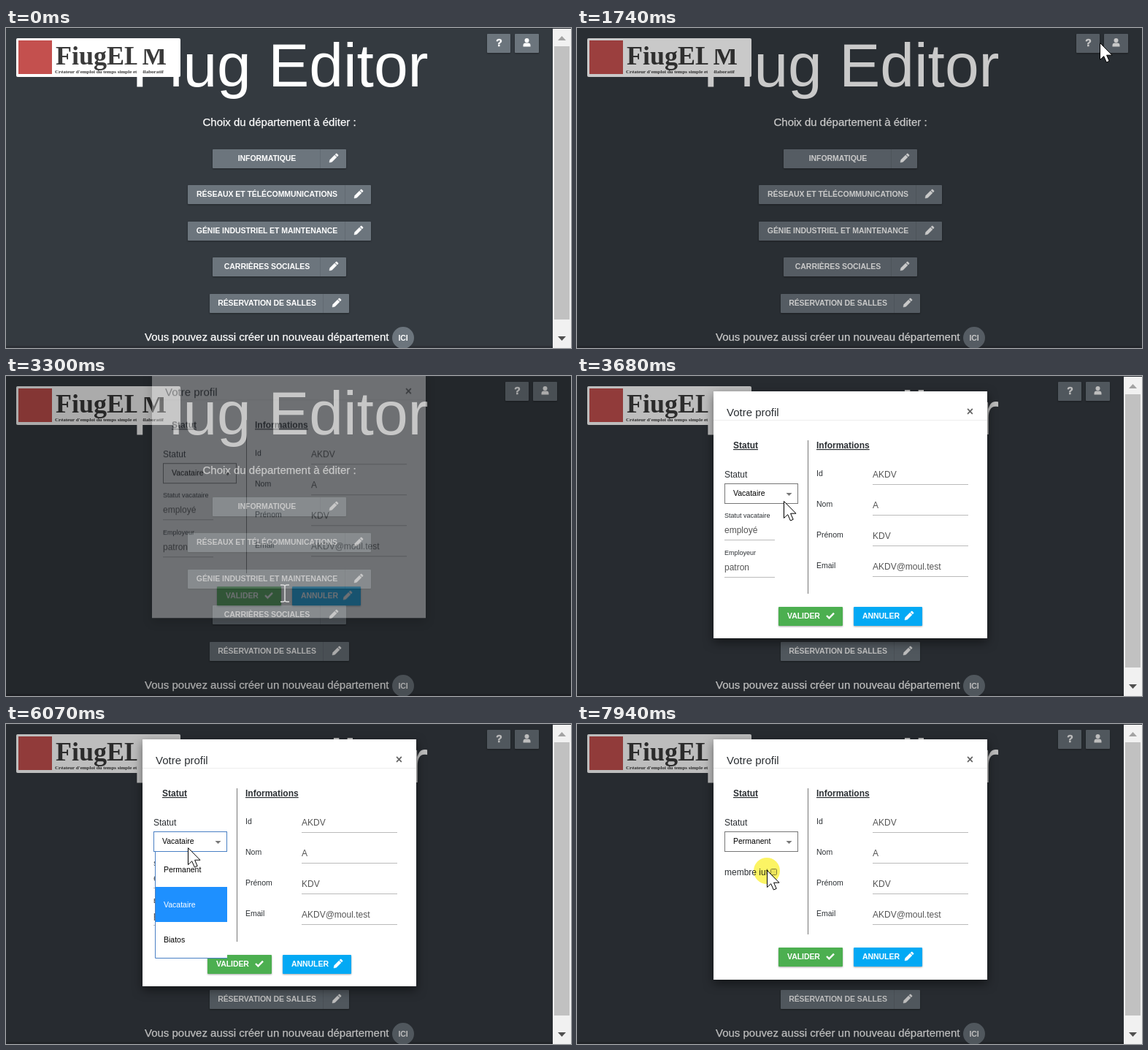
An HTML page for the animation above (8000 ms loop, 774x438 px).

```html
<!DOCTYPE html>
<html lang="fr">
<head>
<meta charset="utf-8">
<title>Profil</title>
<style>
html, body { margin: 0; width: 100%; height: 100%; overflow: hidden; background: #343a40; }
svg { display: block; font-family: "Liberation Sans", Arial, sans-serif; }

.btn { font-size: 10.5px; font-weight: bold; letter-spacing: -.06px; fill: #fff; }
.lift { filter: drop-shadow(0 1px 1px rgba(0, 0, 0, .35)); }
.sheet { fill: #fff; filter: drop-shadow(0 5px 7px rgba(0, 0, 0, .5)); }
.mid { text-anchor: middle; }
.lead { font-size: 15px; }
.page .lead { stroke: #fff; stroke-width: .25px; }
.head { font-size: 12px; font-weight: bold; text-decoration: underline; }
.body { font-size: 12px; }
.small { font-size: 10.5px; }
.tiny { font-size: 9px; }
.field { fill: #555; }
.rule { stroke: #bbb; }
.split { stroke: #777; }
.dialog { fill: #2b2f33; }

/* One loop is 8 s, so 1% is 80 ms. */
.anim { animation: 8s linear infinite; }
.step { animation: 8s step-end infinite; }

#bar { animation-name: bar; }
@keyframes bar { 0% { opacity: 1 } 19.9% { opacity: 0 } 43.1%, 100% { opacity: 1 } }
#tools { animation-name: tools; }
@keyframes tools { 0% { transform: none } 19.9% { transform: translateX(25px) } 43.1%, 100% { transform: none } }
#user { animation-name: user; }
@keyframes user { 0% { fill: #6c757d } 15.5% { fill: #5a6268 } 19.9%, 100% { fill: #6c757d } }
#dim { animation-name: dim; }
@keyframes dim {
  0%, 19.9% { opacity: 0 } 22.2%, 38.25% { opacity: .26 }
  41.25% { opacity: .33 } 43.1%, 100% { opacity: .26 }
}

#view { animation-name: view; }
@keyframes view {
  0%, 22.5% { opacity: 0; transform: translateY(-70px) }
  23.5% { opacity: .4; transform: translateY(-28px) }
  25.5%, 38.25% { opacity: 1; transform: none }
  40.25%, 100% { opacity: 0; transform: translateY(-60px) }
}
#modify { animation-name: modify; }
@keyframes modify { 0% { fill: #03a9f4 } 34%, 100% { fill: #039be1 } }

#edit { animation-name: edit; }
@keyframes edit {
  0%, 40.25% { opacity: 0; transform: translate(13px, -55px) }
  41.25% { opacity: .34; transform: translate(13px, -28px) }
  43.05% { opacity: 1; transform: translate(13px, 0) }
  43.1%, 100% { opacity: 1; transform: none }
}
.before { animation-name: before; }
@keyframes before { 0% { opacity: 1 } 85.6%, 100% { opacity: 0 } }
.after { animation-name: after; }
@keyframes after { 0% { opacity: 0 } 85.6%, 100% { opacity: 1 } }
#actions { animation-name: actions; }
@keyframes actions { 0% { transform: none } 85.6%, 100% { transform: translateY(-10px) } }
#focus { animation-name: focus; }
@keyframes focus { 0% { stroke: #777 } 70.4% { stroke: #4a80c4 } 99.2%, 100% { stroke: #777 } }
#list { animation-name: list; }
@keyframes list { 0% { opacity: 0 } 71.25% { opacity: 1 } 85.6%, 100% { opacity: 0 } }
#mark { animation-name: mark; }
@keyframes mark { 0% { transform: none } 77%, 100% { transform: translateY(-48px) } }
#opt1 { animation-name: opt1; }
@keyframes opt1 { 0% { fill: #000 } 77%, 100% { fill: #fff } }
#opt2 { animation-name: opt2; }
@keyframes opt2 { 0% { fill: #fff } 77%, 100% { fill: #000 } }

#cursor { animation-name: move; }
@keyframes move {
  0%, 3.4% { transform: translate(594px, 391px) }
  5.4% { transform: translate(540px, 262px) }
  6.4% { transform: translate(518px, 195px) }
  7.375%, 9.1% { transform: translate(523px, 157px) }
  13%, 14.2% { transform: translate(733px, 26px) }
  17%, 23.75% { transform: translate(716px, 20px) }
  28.5% { transform: translate(466px, 222px) }
  32% { transform: translate(395px, 282px) }
  34.5%, 38.25% { transform: translate(379px, 296px) }
  41.25%, 42.3% { transform: translate(382px, 297px) }
  46% { transform: translate(283px, 171px) }
  48% { transform: translate(276px, 166px) }
  49.9%, 53.7% { transform: translate(276px, 163px) }
  58% { transform: translate(232px, 205px) }
  62% { transform: translate(216px, 246px) }
  64.4% { transform: translate(222px, 240px) }
  69.4%, 73.1% { transform: translate(249px, 165px) }
  75.875% { transform: translate(249px, 169px) }
  80.9%, 87.6% { transform: translate(242px, 206px) }
  93% { transform: translate(251px, 196px) }
  98.25%, 100% { transform: translate(260px, 200px) }
}
#arrow { animation-name: arrow; }
@keyframes arrow {
  0% { opacity: 0 } 3.5% { opacity: 1 } 15.5% { opacity: 0 } 19.9% { opacity: 1 }
  33.7% { opacity: 0 } 42.5%, 100% { opacity: 1 }
}
#hand { animation-name: hand; }
@keyframes hand {
  0% { opacity: 0 } 15.5% { opacity: 1 } 19.9% { opacity: 0 }
  33.7% { opacity: 1 } 40.5%, 100% { opacity: 0 }
}
#beam { animation-name: beam; }
@keyframes beam { 0% { opacity: 0 } 40.5% { opacity: 1 } 42.5%, 100% { opacity: 0 } }
#click {
  mix-blend-mode: multiply;
  animation: move 8s linear infinite, click 8s step-end infinite;
}
@keyframes click {
  0% { opacity: 0 } 18.9% { opacity: 1 } 19.9% { opacity: 0 }
  36.3% { opacity: 1 } 38.2% { opacity: 0 }
  70.4% { opacity: 1 } 71.25% { opacity: 0 }
  84.6% { opacity: 1 } 85.6% { opacity: 0 } 99.2%, 100% { opacity: 1 }
}
</style>
</head>
<body>
<svg width="774" height="438" viewBox="0 0 774 438">
  <defs>
    <path id="pencil" fill="#fff" stroke="#fff" stroke-width=".5" d="M-6 6l.7-3.500L1.200-4 4-1.200-2.500 5.300zM2-4.800l.9-.9c.5-.5 1.100-.4 1.600 0l1.200 1.200c.4.5.5 1.100 0 1.600l-.9.9z"/>
    <path id="check" fill="none" stroke="#fff" stroke-width="2.4" d="M-5 0l3.400 3.400L5-3.400"/>
  </defs>

  <rect width="774" height="438" fill="#343a40"/>
  <path fill="#2c3036" d="M0 435h774v3H0z"/>

  <g id="logo">
    <rect x="14" y="14" width="225" height="53" rx="2" fill="#fff"/>
    <rect x="17" y="17" width="46" height="46" fill="#c4504e"/>
    <g font-family="'Liberation Serif', serif" font-weight="bold" fill="#3a3a3a">
      <text x="68" y="50" font-size="36">FiugELM</text>
      <text x="67" y="62" font-size="7">Créateur d'emploi du temps simple et collaboratif</text>
    </g>
  </g>

  <g class="page" fill="#fff">
    <text class="mid" x="375.5" y="79.5" font-size="84">Fiug Editor</text>
    <text class="lead" x="269.5" y="134">Choix du département à éditer :</text>
    <text class="lead" x="190" y="428">Vous pouvez aussi créer un nouveau département</text>
  </g>
  <circle cx="544" cy="424" r="15" fill="#6c757d"/>
  <text class="btn mid" x="544" y="428">ICI</text>
  <g id="deps"></g>

  <g id="tools" class="step">
    <g class="lift">
      <rect x="659" y="8" width="32" height="26" rx="1" fill="#6c757d"/>
      <rect id="user" class="step" x="697" y="8" width="33" height="26" rx="1" fill="#6c757d"/>
    </g>
    <text class="mid" x="675.5" y="24.5" font-size="14" font-weight="bold" fill="#fff" stroke="#fff" stroke-width=".5">?</text>
    <g fill="#fff">
      <circle cx="713.5" cy="17" r="3"/>
      <path d="M708.500 25.500v-1.700c0-2 1.300-3.200 3.200-3.200h3.600c1.900 0 3.200 1.200 3.200 3.200v1.700z"/>
    </g>
  </g>

  <rect id="dim" class="anim" width="774" height="438"/>

  <g id="bar" class="step">
    <rect x="749" width="25" height="438" fill="#f1f1f1"/>
    <rect x="751" y="25" width="21" height="374" fill="#c1c1c1"/>
    <path fill="#a3a3a3" d="M756 17l5.500-6 5.500 6z"/>
    <path fill="#505050" d="M756 422l5.500 6 5.500-6z"/>
  </g>
  <rect width="774" height="1" fill="#2c3036"/>

  <g id="view" class="anim dialog">
    <rect class="sheet" x="187" y="21" width="375" height="315"/>
    <g class="title"></g>
    <path class="split" d="M316.500 88v236"/>
    <g class="body">
      <text x="214" y="137">Statut : Vacataire</text>
      <text x="214" y="179">Statut vacataire :</text>
      <text x="214" y="191">employé</text>
      <text x="214" y="233">Employeur :</text>
      <text x="214" y="245">patron</text>
    </g>
    <g id="infos" class="small"></g>
    <rect id="modify" class="step lift" x="328" y="294" width="86" height="26" rx="1"/>
    <text class="btn" x="340" y="311">MODIFIER</text>
    <use href="#pencil" x="398" y="306"/>
  </g>

  <g id="edit" class="anim dialog">
    <rect class="step before sheet" x="187" y="21" width="375" height="338"/>
    <rect class="step after sheet" x="187" y="21" width="375" height="329"/>
    <g class="title"></g>
    <path class="split" d="M316.500 88v200"/>
    <path class="step before split" d="M316.500 288v10"/>
    <text class="body" x="202" y="139">Statut</text>
    <rect id="focus" class="step" x="202.5" y="147.5" width="100" height="27" fill="#fff"/>
    <path fill="#777" d="M286.500 160h8l-4 4z"/>
    <g id="fields"></g>

    <g class="step before">
      <text class="small" x="214" y="164" fill="#000">Vacataire</text>
      <text class="tiny" x="202" y="194">Statut vacataire</text>
      <text class="body field" x="202" y="215">employé</text>
      <text class="tiny" x="202" y="245">Employeur</text>
      <text class="body field" x="202" y="266">patron</text>
      <path class="rule" d="M202 224.500h69M202 275.500h69"/>
    </g>
    <g class="step after">
      <text class="small" x="214" y="164" fill="#000">Permanent</text>
      <text class="body" x="202" y="207">membre iut</text>
      <rect x="265.5" y="198.5" width="8" height="8" rx="1" fill="#eee" stroke="#888"/>
    </g>

    <g id="actions" class="step">
      <g class="lift">
        <rect x="276" y="316" width="88" height="26" rx="1" fill="#4caf50"/>
        <rect x="379" y="316" width="94" height="26" rx="1" fill="#03a9f4"/>
      </g>
      <text class="btn" x="288" y="332">VALIDER</text>
      <use href="#check" x="347" y="328"/>
      <text class="btn" x="391" y="332">ANNULER</text>
      <use href="#pencil" x="455" y="328"/>
    </g>

    <g id="list" class="step small">
      <rect x="204" y="175" width="99" height="146" fill="#fff"/>
      <rect id="mark" class="step" x="205" y="223" width="98" height="48" fill="#1e90ff"/>
      <path fill="none" stroke="#4a80c4" d="M204.500 175v145.500H303"/>
      <text id="opt1" class="step" x="216" y="203">Permanent</text>
      <text id="opt2" class="step" x="216" y="251">Vacataire</text>
      <text x="216" y="299" fill="#000">Biatos</text>
    </g>
  </g>

  <circle id="click" cy="1" r="18" fill="#fcf464"/>
  <g id="cursor" class="anim" fill="#fff" stroke="#000" stroke-linejoin="round">
    <path id="arrow" class="step" d="M.5.5v23l5.200-4.800 3.700 8.300 3.800-1.700-3.600-8.100H17z"/>
    <g id="hand" class="step">
      <path d="M-3 2C-3-1 3-1 3 2v9c1-2 5-1.500 5 1 1-1.500 4-1 4 1.500 1.500-1.500 4-.5 4 2V22c0 4-2 6-3 10H0c-1-4-6-8-9-14-1-3 3-4 6 0z"/>
      <path fill="none" d="M3 11v6M8 12v5M12 13.500V17"/>
    </g>
    <path id="beam" class="step" fill="none" stroke="#ddd" stroke-width="1.5" d="M-6-11h3q3 0 3 2 0-2 3-2h3M-6 12h3q3 0 3-2 0 2 3 2h3M0-9v19"/>
  </g>
</svg>

<script>
const fill = (sel, html) =>
  document.querySelectorAll(sel).forEach(el => el.innerHTML = html);

// label, left edge, width, top
const deps = [
  ["INFORMATIQUE", 283, 183, 166],
  ["RÉSEAUX ET TÉLÉCOMMUNICATIONS", 249, 251, 215],
  ["GÉNIE INDUSTRIEL ET MAINTENANCE", 249, 251, 265],
  ["CARRIÈRES SOCIALES", 283, 183, 314],
  ["RÉSERVATION DE SALLES", 279, 191, 364]
];
fill("#deps", deps.map(([label, x, w, y]) => `
  <rect class="lift" x="${x}" y="${y}" width="${w}" height="26" rx="1" fill="#6c757d"/>
  <path stroke="#626a72" d="M${x + w - 35.5} ${y}v26"/>
  <text class="btn mid" x="${x + (w - 35) / 2 + 0.5}" y="${y + 16}">${label}</text>
  <use href="#pencil" x="${x + w - 17}" y="${y + 12}"/>`).join(""));

fill(".title", `
  <text class="lead" x="205" y="55">Votre profil</text>
  <text class="mid" x="538.5" y="54" font-size="16" font-weight="bold" fill="#666">×</text>
  <path stroke="#eee" d="M187 60.5h375"/>
  <text class="head" x="214" y="99">Statut</text>
  <text class="head" x="328" y="99">Informations</text>`);

const values = ["AKDV", "A", "KDV", "AKDV@moul.test"];
fill("#infos", ["Id", "Prénom", "Nom", "Email"].map((label, i) => `
  <text x="328" y="${137 + 39 * i}">${label}</text>
  <text x="405" y="${137 + 39 * i}">${values[i]}</text>`).join(""));
fill("#fields", ["Id", "Nom", "Prénom", "Email"].map((label, i) => `
  <text class="small" x="328" y="${137 + 42 * i}">${label}</text>
  <text class="body field" x="405" y="${139 + 42 * i}">${values[i]}</text>
  <path class="rule" d="M405 ${148.5 + 42 * i}h131"/>`).join(""));
</script>
</body>
</html>
```
